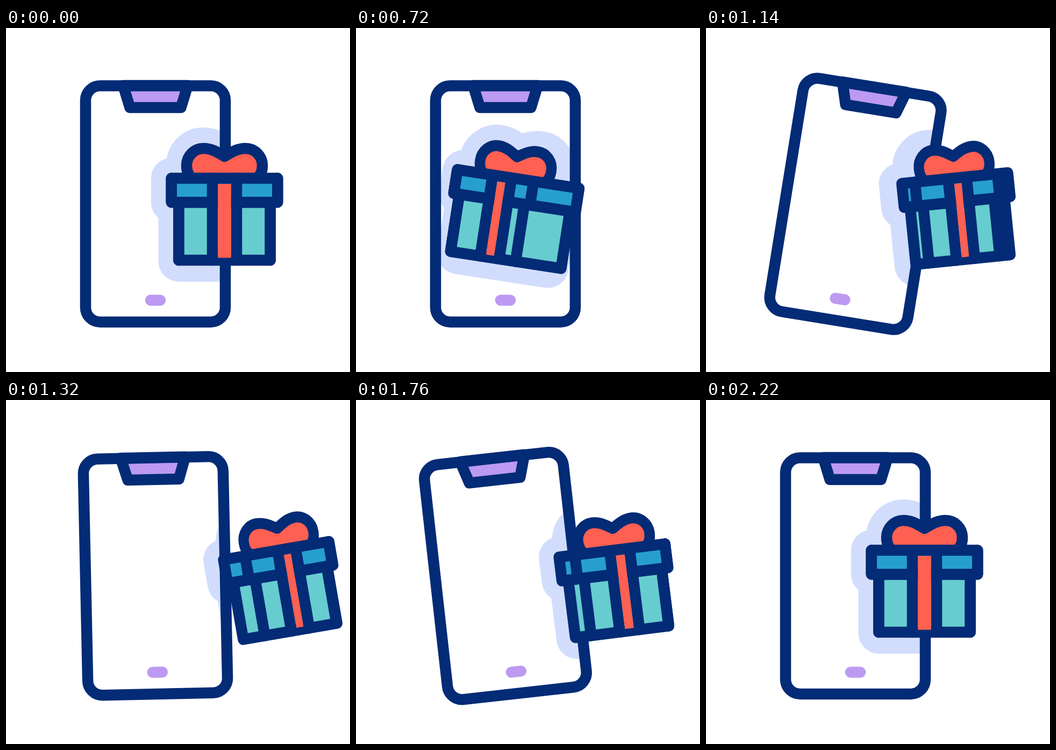
These frames come from a looping animation (640x640 px, 2420 ms). An HTML page with a canvas:

```html
<!DOCTYPE html>
<html lang="en">
<head>
<meta charset="utf-8">
<title>Gift phone</title>
<style>
  html, body { margin: 0; width: 100%; height: 100%; overflow: hidden; background: #fff; }
  canvas { display: block; width: 640px; height: 640px; }
</style>
</head>
<body>
<canvas id="stage" width="640" height="640"></canvas>
<script>
const ctx = document.getElementById('stage').getContext('2d');
const NAVY = '#032b76', LILAC = '#bc9af2', SHADOW = '#d2ddfd';
const RED = '#ff6051', BLUE = '#279fcd', TEAL = '#67cccf';
const LINE = 20.5, LOOP = 2420;
const PHONE = { x: 278, y: 327.25 }, GIFT = { x: 406.5, y: 328 };
const LID_TOP = -48.5, LID_BOTTOM = -3.75, BASE = 104;

const bow = new Path2D('M-60-48Q-70.5-56-70.5-72.5A31.5 31.5 0 0 1-39-104C-23-104-12-96 0-89' +
  'C12-96 23-104 39-104A31.5 31.5 0 0 1 70.5-72.5Q70.5-56 60-48Z');
const notch = new Path2D('M218 107L230.5 148H325.5L338 107Z');

// Horizontal positions are measured from the middle of the gift.
// A negative sideFace means the left side of the box is turned away.
const pose = (x, angle, sideFace, leftCorner, rightCorner, right, ribbon, ribbonWidth, inset, bowX, bowScale) =>
  ({ x, angle, sideFace, leftCorner, rightCorner, right, ribbon, ribbonWidth, inset, bowX, bowScale });
const rest = pose(0, 0, 0, -98.75, 98.75, 98.75, 0, 45, 13.5, 0, 1);
const inside = pose(-131, 9.9, -39, -112.6, 30, 121, -28, 35.6, 10.5, -4, 0.95);
const outside = pose(106.5, -10, 41.5, -58, 99.5, 99.5, 20, 33.7, 11, 9, 0.93);
const keys = [[0, rest], [450, inside], [610, inside], [1365, outside], [1510, outside], [2216, rest], [LOOP, rest]];

const smooth = u => u * u * (3 - 2 * u);
const mix = (a, b, u) => a + (b - a) * u;

function giftPose(t) {
  const i = keys.findIndex(([end]) => t < end);
  const [start, from] = keys[i - 1], [end, to] = keys[i];
  const u = smooth((t - start) / (end - start));
  return Object.fromEntries(Object.keys(from).map(k => [k, mix(from[k], to[k], u)]));
}

function phoneAngle(t) {
  const phase = (t - 990) / 134.6, n = Math.floor(phase);
  const swing = k => k <= 0 || k >= 9 ? 0 : k % 2 ? 10 : -10;
  return mix(swing(n), swing(n + 1), smooth(phase - n));
}

function place(x, y, degrees) {
  ctx.setTransform(1, 0, 0, 1, x, y);
  ctx.rotate(degrees * Math.PI / 180);
}

function rect(x1, y1, x2, y2, radius = 0) {
  const p = new Path2D();
  p.roundRect(x1, y1, x2 - x1, y2 - y1, radius);
  return p;
}

function paint(path, fill, stroke = NAVY, width = LINE) {
  ctx.lineWidth = width;
  ctx.fillStyle = fill;
  ctx.strokeStyle = stroke;
  ctx.fill(path);
  ctx.stroke(path);
}

function line(x1, y1, x2, y2, color = NAVY) {
  ctx.lineWidth = LINE;
  ctx.strokeStyle = color;
  ctx.beginPath();
  ctx.moveTo(x1, y1);
  ctx.lineTo(x2, y2);
  ctx.stroke();
}

function placeBow(g) {
  ctx.translate(g.bowX, 0);
  ctx.scale(g.bowScale, 1);
}

function drawShadow(g) {
  const halo = path => paint(path, SHADOW, SHADOW, 76);
  halo(rect(-98.75, LID_TOP, 98.75, LID_BOTTOM));
  halo(rect(-85, LID_BOTTOM, 85, BASE + 2));
  ctx.translate(0, -1);
  halo(bow);
}

function drawGift(g) {
  const left = g.leftCorner - Math.max(0, g.sideFace);
  ctx.save();
  placeBow(g);
  paint(bow, RED);
  ctx.restore();
  paint(rect(left + g.inset, LID_BOTTOM, g.right - g.inset, BASE), TEAL);
  paint(rect(left, LID_TOP, g.right, LID_BOTTOM), BLUE);
  for (const [x, side] of [[g.leftCorner, 1], [g.rightCorner, -1]]) {
    line(x, LID_TOP, x, LID_BOTTOM);
    line(x + side * g.inset, LID_BOTTOM, x + side * g.inset, BASE);
  }
  const half = g.ribbonWidth / 2;
  for (const x of [g.ribbon - half, g.ribbon + half]) line(x, LID_TOP, x, BASE);
  const redHalf = half - LINE / 2;
  ctx.fillStyle = RED;
  ctx.fillRect(g.ribbon - redHalf, -38, 2 * redHalf, 137.5);
}

function draw(t) {
  const g = giftPose(t), tilt = phoneAngle(t);
  const placeGift = () => place(GIFT.x + g.x, GIFT.y, g.angle);
  const placePhone = () => {
    place(PHONE.x, PHONE.y, tilt);
    ctx.translate(-PHONE.x, -PHONE.y);
  };
  const body = rect(148, 107.5, 408, 547, 27);

  ctx.resetTransform();
  ctx.clearRect(0, 0, 640, 640);
  ctx.lineJoin = ctx.lineCap = 'round';

  ctx.save();
  placePhone();
  ctx.clip(body);
  placeGift();
  drawShadow(g);
  ctx.restore();

  placePhone();
  paint(notch, LILAC);
  paint(body, 'transparent');
  line(269, 506.5, 287, 506.5, LILAC);

  placeGift();
  drawGift(g);
}

function tick() {
  draw(performance.now() % LOOP);
  requestAnimationFrame(tick);
}
tick();
</script>
</body>
</html>
```
